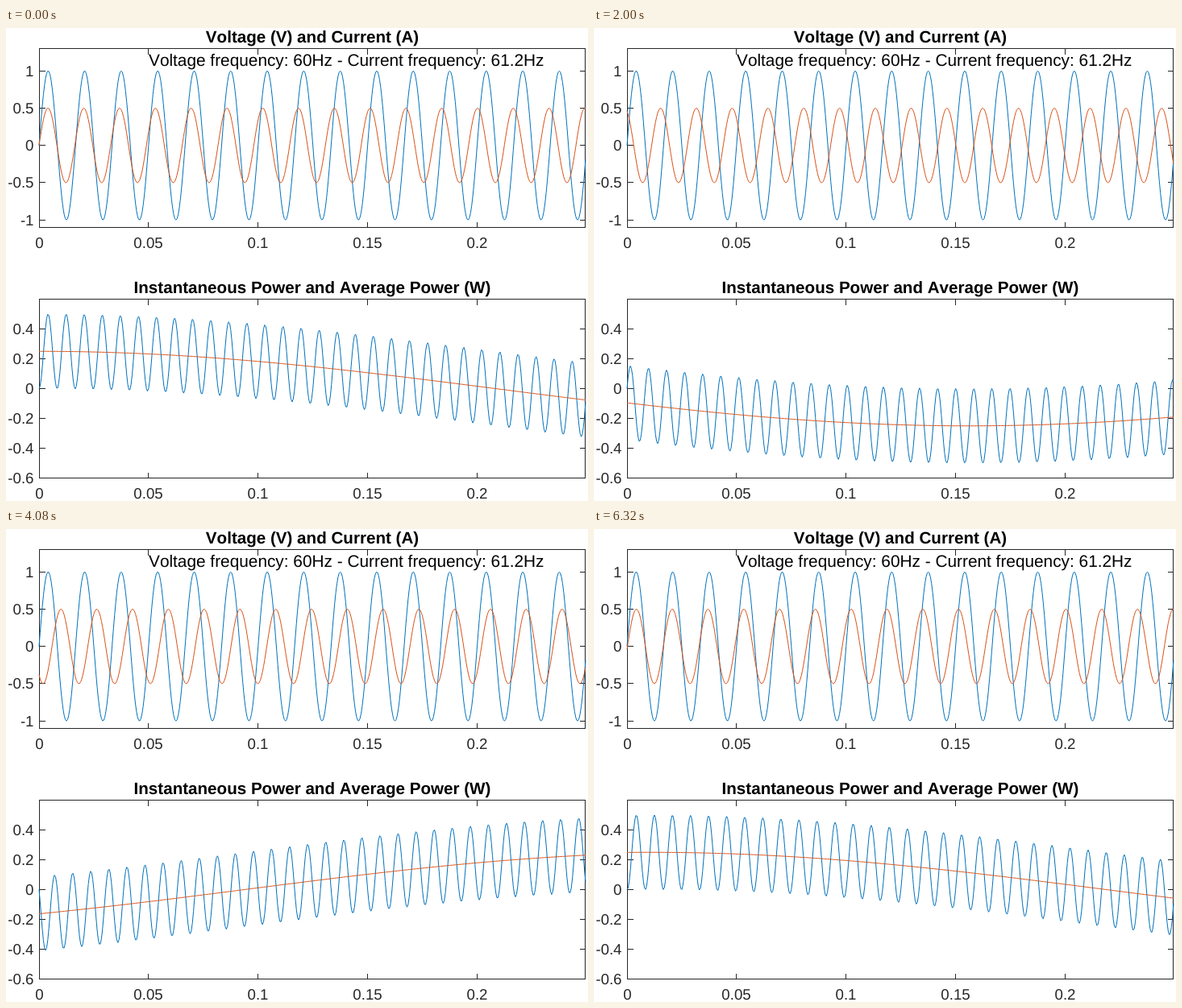
Animation of 722x587 px, one loop 6.4 s. Source, as an HTML page:

```html
<!DOCTYPE html>
<html lang="en">
<head>
<meta charset="utf-8">
<title>Voltage, current and power</title>
<style>
  html, body { margin: 0; width: 100%; height: 100%; overflow: hidden; background: #fff; }
  svg {
    display: block;
    font-family: "Liberation Sans", Arial, sans-serif;
    font-kerning: none;
    text-rendering: geometricPrecision;
  }
  path { fill: none; stroke-width: 1; stroke-linejoin: round; }
  .axis { stroke: #262626; shape-rendering: crispEdges; }
  .blue { stroke: #0072bd; }
  .red { stroke: #d95319; }
  .tick { fill: #262626; font-size: 18.667px; }
  .title { font-size: 20.6px; font-weight: bold; text-anchor: middle; }
  .note { font-size: 20.82px; }
</style>
</head>
<body>
<svg id="stage" width="722" height="587" viewBox="0 0 722 587"></svg>
<script>
const stage = document.getElementById('stage');
const LEFT = 41, RIGHT = 719, T_MAX = 0.2495, DT = 0.0005, TICK = 7;
const FRAME = 80, FRAMES = 80;
const F_VOLT = 60, F_CURR = 61.2, TAU = 2 * Math.PI;

function add(name, attrs, text) {
  const el = document.createElementNS('http://www.w3.org/2000/svg', name);
  for (const key in attrs) el.setAttribute(key, attrs[key]);
  if (text !== undefined) el.textContent = text;
  return stage.appendChild(el);
}

const xAt = t => LEFT + t / T_MAX * (RIGHT - LEFT);
const snap = v => Math.ceil(v) - 0.5;

function makeAxes({ top, bottom, min, max, ticks, title }) {
  const yAt = v => top + (max - v) / (max - min) * (bottom - top);
  const x0 = LEFT + 0.5, x1 = RIGHT - 0.5;
  let d = `M${x0} ${top}H${x1}V${bottom}H${x0}Z`;
  for (const t of [0, 0.05, 0.1, 0.15, 0.2]) {
    const x = Math.max(x0, snap(xAt(t)));
    d += `M${x} ${bottom}v${-TICK}M${x} ${top}v${TICK}`;
    add('text', { class: 'tick', x, y: bottom + 25.5, 'text-anchor': 'middle' }, t);
  }
  for (const v of ticks) {
    const y = snap(yAt(v));
    d += `M${x0} ${y}h${TICK}M${x1} ${y}h${-TICK}`;
    add('text', { class: 'tick', x: 34.5, y: y + 6.5, 'text-anchor': 'end' }, v);
  }
  add('path', { class: 'axis', d });
  add('text', { class: 'title', x: 380, y: top - 7.5 }, title);
  return yAt;
}

function plot(path, yAt, fn) {
  const points = [];
  for (let i = 0; i * DT <= T_MAX + 1e-9; i++) {
    const t = i * DT;
    points.push(xAt(t).toFixed(2) + ' ' + yAt(fn(t)).toFixed(2));
  }
  path.setAttribute('d', 'M' + points.join('L'));
}

const waveY = makeAxes({
  top: 25.5, bottom: 247.5, min: -1.1, max: 1.3,
  ticks: [-1, -0.5, 0, 0.5, 1], title: 'Voltage (V) and Current (A)'
});
const powerY = makeAxes({
  top: 336.5, bottom: 558.5, min: -0.6, max: 0.6,
  ticks: [-0.6, -0.4, -0.2, 0, 0.2, 0.4], title: 'Instantaneous Power and Average Power (W)'
});

const [voltLine, currLine, powerLine, meanLine] =
  ['blue', 'red', 'blue', 'red'].map(c => add('path', { class: c }));
add('text', { class: 'note', x: 177, y: 47 },
  `Voltage frequency: ${F_VOLT}Hz - Current frequency: ${F_CURR}Hz`);

const volt = t => Math.sin(TAU * F_VOLT * t);
plot(voltLine, waveY, volt);

let shown = -1;
function draw(step) {
  if (step === shown) return;
  shown = step;
  const phase = TAU * step / FRAMES;
  const curr = t => 0.5 * Math.sin(TAU * F_CURR * t + phase);
  plot(currLine, waveY, curr);
  plot(powerLine, powerY, t => volt(t) * curr(t));
  plot(meanLine, powerY, t => 0.25 * Math.cos(TAU * (F_CURR - F_VOLT) * t + phase));
}

function tick(now) {
  draw(Math.floor(now / FRAME) % FRAMES);
  requestAnimationFrame(tick);
}
draw(0);
requestAnimationFrame(tick);
</script>
</body>
</html>
```
